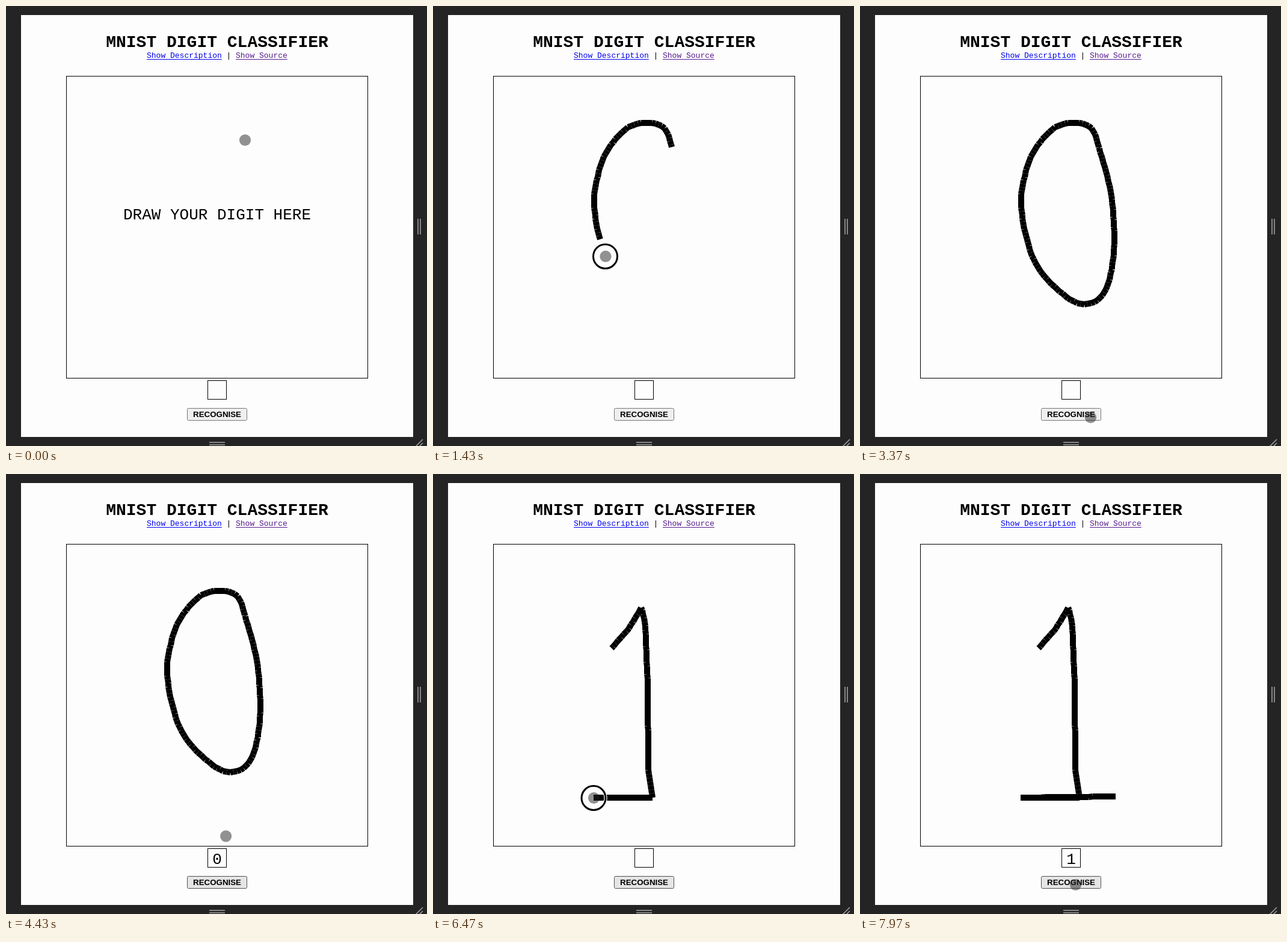
An HTML page with a canvas for the animation above (8 s loop, 700 px wide and 730 px high).

```html
<!DOCTYPE html>
<html lang="en">
<head>
<meta charset="utf-8">
<title>Digit classifier</title>
<style>
  html, body { margin: 0; width: 100%; height: 100%; overflow: hidden; background: #242424; }
  canvas { display: block; }
</style>
</head>
<body>
<canvas id="stage" width="700" height="730"></canvas>
<script>
const ctx = document.getElementById('stage').getContext('2d');

const LOOP = 8000;
const LAG = 66;    // ink trails the pointer
const STEP = 13;   // time between ink samples
const PEN = 10;
const PAGE = '#fdfdfd';
const MONO = '"Liberation Mono", monospace';
const SANS = '"Liberation Sans", sans-serif';

const smoothstep = u => u * u * (3 - 2 * u);
const during = t => s => t >= s.start && t < s.end;

// Catmull-Rom curve through the points, as a fine polyline.
function curve(points, steps = 8) {
  const at = i => points[Math.min(points.length - 1, Math.max(0, i))];
  const out = [points[0]];
  for (let i = 0; i < points.length - 1; i++) {
    const [a, b, c, d] = [at(i - 1), at(i), at(i + 1), at(i + 2)];
    for (let k = 1; k <= steps; k++) {
      const u = k / steps;
      out.push([0, 1].map(n => b[n] + 0.5 * u * (c[n] - a[n]
        + u * (2 * a[n] - 5 * b[n] + 4 * c[n] - d[n]
        + u * (3 * (b[n] - c[n]) + d[n] - a[n])))));
    }
  }
  return out;
}

// Point at fraction u of a polyline's length.
function along(path, u) {
  const lengths = path.slice(1).map((p, i) => Math.hypot(p[0] - path[i][0], p[1] - path[i][1]));
  let rest = u * lengths.reduce((sum, n) => sum + n, 0);
  let i = 0;
  while (i < lengths.length - 1 && rest > lengths[i]) rest -= lengths[i++];
  const f = rest / lengths[i];
  return [0, 1].map(n => path[i][n] + (path[i + 1][n] - path[i][n]) * f);
}

const rest = [397, 222], zeroStart = [397, 234], button = [383, 682];
const oneStart = [297, 289], baseLeft = [267, 537], baseRight = [425, 535];

const zero = curve([
  zeroStart, [385, 203], [357, 194], [322, 203], [288, 243], [272, 290], [268, 330],
  [277, 385], [298, 437], [345, 484], [380, 494], [408, 472], [422, 408],
  [418, 315], [397, 234]
]);
const hook = [
  oneStart, [326, 256], [347, 221], [353, 250], [357, 350], [358, 488], [365, 537], baseLeft
];

const travel = (start, end, ...path) => ({ start, end, path, ease: smoothstep });
const trace = (start, end, path) => ({ start, end, path, ease: u => u });

// The pointer waits at the end of each leg until the next begins.
const legs = [
  travel(250, 600, rest, zeroStart),
  trace(692, 2345, zero),
  travel(2480, 3300, zeroStart, button),
  travel(4120, 5180, button, oneStart),
  trace(5420, 6400, hook),
  trace(6480, 6790, [baseLeft, baseRight]),
  travel(6900, 7600, baseRight, [385, 684]),
  travel(7760, 7930, [385, 684], [358, 681])
];

const strokes = [{ start: 650, end: 2440 }, { start: 5350, end: 6860 }];
const clicks = [{ start: 3470, end: 3590 }, { start: 7630, end: 7760 }];
const presses = strokes.concat(clicks);
const results = [
  { text: '0', start: 3590, end: strokes[1].start },
  { text: '1', start: 7720, end: LOOP }
];

function pointerAt(t) {
  const leg = legs.filter(l => t >= l.start).pop() || legs[0];
  const u = Math.min(1, Math.max(0, (t - leg.start) / (leg.end - leg.start)));
  return along(leg.path, leg.ease(u));
}

function line(x0, y0, x1, y1, width, color) {
  ctx.strokeStyle = color;
  ctx.lineWidth = width;
  ctx.beginPath();
  ctx.moveTo(x0, y0);
  ctx.lineTo(x1, y1);
  ctx.stroke();
}

function text(str, x, y, font, color = '#000', align = 'center') {
  ctx.font = font;
  ctx.fillStyle = color;
  ctx.textAlign = align;
  ctx.fillText(str, x, y);
}

function frame(x, y, size) {
  ctx.strokeStyle = '#000';
  ctx.lineWidth = 1;
  ctx.strokeRect(x + 0.5, y + 0.5, size, size);
}

function link(str, x, color) {
  text(str, x, 86, '13px ' + MONO, color, 'left');
  line(x, 88.5, x + ctx.measureText(str).width, 88.5, 1, color);
}

function drawPage() {
  ctx.fillStyle = '#242424';
  ctx.fillRect(0, 0, 700, 730);
  ctx.fillStyle = PAGE;
  ctx.fillRect(25, 15, 652, 700);

  const grip = '#a0a0a0';
  for (const d of [0, 4]) {
    line(685 + d, 353, 685 + d, 379, 1.6, grip);
    line(338, 724 + d, 364, 724 + d, 1.6, grip);
  }
  line(681, 731, 693, 719, 1.6, grip);
  line(687, 731, 693, 725, 1.6, grip);

  text('MNIST DIGIT CLASSIFIER', 351, 68, 'bold 28px ' + MONO);
  link('Show Description', 234, '#0000ee');
  text('|', 370.5, 86, '13px ' + MONO);
  link('Show Source', 382, '#551a8b');
  frame(100, 116, 501);
  frame(335, 621, 31);
}

function drawButton(hovered) {
  ctx.beginPath();
  ctx.roundRect(301.5, 667.5, 99, 20, 2);
  ctx.fillStyle = hovered ? '#e5e5e5' : '#efefef';
  ctx.fill();
  ctx.strokeStyle = hovered ? '#4f4f4f' : '#767676';
  ctx.lineWidth = 1;
  ctx.stroke();
  text('RECOGNISE', 351, 682, 'bold 13.333px ' + SANS);
}

// Ink is a chain of separate butt-ended pieces on whole pixels.
function drawInk(t) {
  const stroke = strokes.filter(s => t >= s.start).pop();
  if (!stroke) return;
  const last = Math.min(t - LAG, stroke.end);
  let prev = null;
  for (let s = stroke.start; s <= last; s += STEP) {
    const p = pointerAt(s).map(Math.round);
    if (prev) line(...prev, ...p, PEN, '#000');
    prev = p;
  }
}

function circle(x, y, r) {
  ctx.beginPath();
  ctx.arc(x, y, r, 0, Math.PI * 2);
}

function drawPointer(t) {
  const [x, y] = pointerAt(t);
  circle(x + 0.5, y + 0.5, 9.6);
  ctx.fillStyle = 'rgba(38, 38, 38, 0.5)';
  ctx.fill();
  if (!presses.some(during(t))) return;
  for (const [width, color] of [[5.4, PAGE], [3, '#000']]) {
    circle(x, y + 0.5, 20);
    ctx.strokeStyle = color;
    ctx.lineWidth = width;
    ctx.stroke();
  }
}

function draw(t) {
  drawPage();
  drawButton(t >= clicks[0].end);
  if (t < strokes[0].start) text('DRAW YOUR DIGIT HERE', 351, 354, '26px ' + MONO);
  drawInk(t);
  const result = results.find(during(t));
  if (result) text(result.text, 351, 647, '26px ' + MONO);
  drawPointer(t);
}

const began = performance.now();
function tick() {
  draw((performance.now() - began) % LOOP);
  requestAnimationFrame(tick);
}
tick();
</script>
</body>
</html>
```
